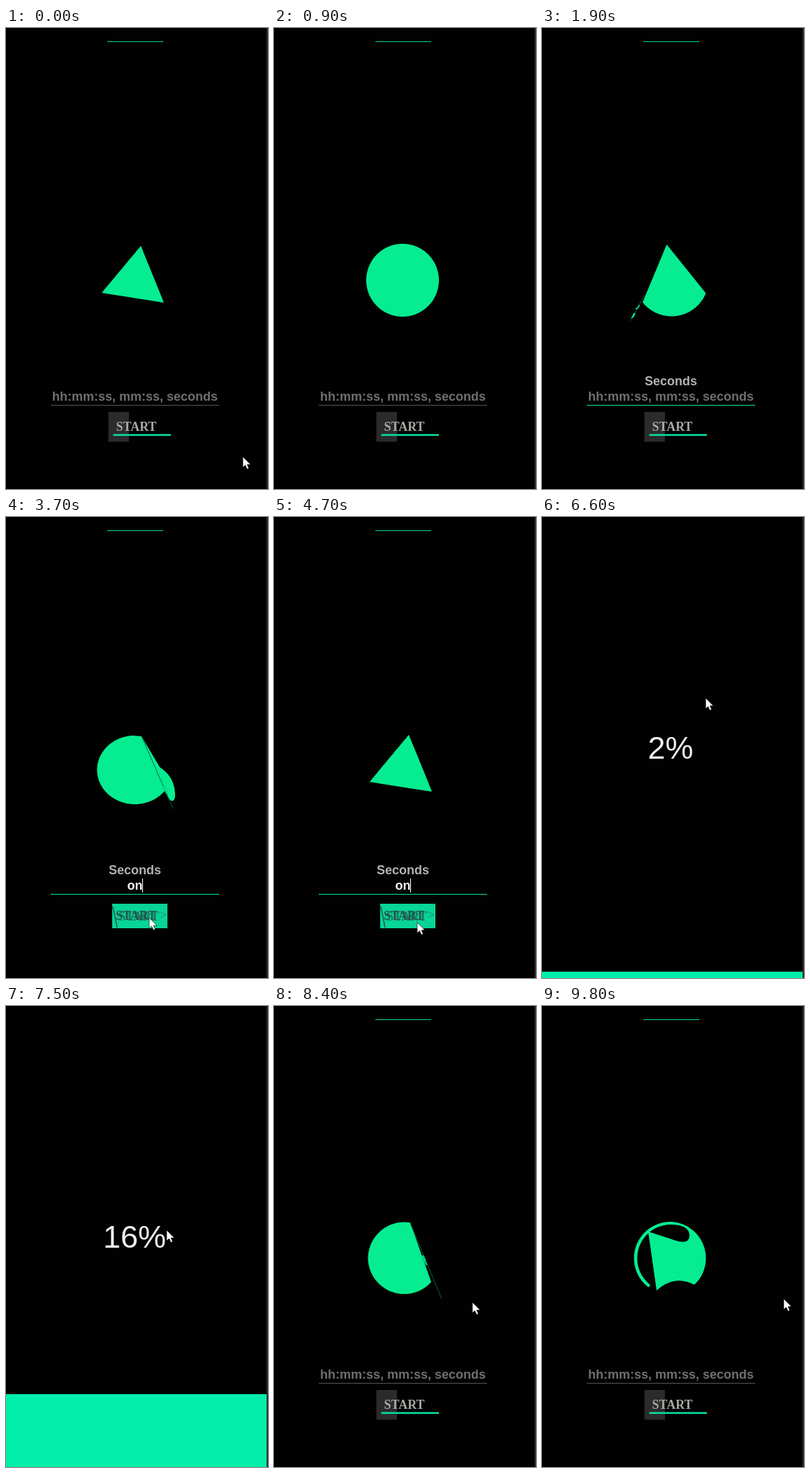
Write an HTML page that moves like this. It is 375 by 658 pixels and loops after 9900 ms.

```html
<!DOCTYPE html>
<html lang="en">
<head>
<meta charset="utf-8">
<title>Timer</title>
<style>
html, body { margin: 0; width: 100%; height: 100%; overflow: hidden; background: #000; }
svg { display: block; width: 375px; height: 658px; }
text { text-anchor: middle; }
.sans { font: bold 18px "Liberation Sans", Arial, sans-serif; }
.serif { font: bold 18px "Liberation Serif", Times, serif; }
.percent { font: 45px "Liberation Sans", Arial, sans-serif; fill: #eee; }
</style>
</head>
<body>
<svg viewBox="0 0 375 658">
  <rect width="375" height="658" fill="#010102"/>
  <g id="form">
    <rect x="145" y="19" width="80" height="1" fill="#08d898"/>
    <path id="blob" fill="#05ed90"/>
    <g id="slivers" stroke-linecap="round"></g>
    <text id="label" class="sans" x="184.5" y="510" fill="#b3b2b3">Seconds</text>
    <text id="value" class="sans" x="184.5" y="532"></text>
    <rect id="caret" x="195" y="516" width="1" height="20" fill="#fff"/>
    <rect id="underline" x="64" y="538" width="241" height="1"/>
    <g id="button">
      <rect x="146.5" y="548" width="29.5" height="42.5" fill="#2b2b2b"/>
      <text class="serif" x="186.5" y="575" fill="#aaa7a3">START</text>
      <rect x="153.5" y="579.6" width="82.5" height="2.6" fill="#08dfa0"/>
    </g>
    <g id="hover" fill="#24564a">
      <rect x="152" y="552" width="79" height="35" fill="#07d496"/>
      <path d="M153 556L159 586" stroke="#24564a" stroke-width="1.5"/>
      <text class="serif" x="186" y="575">START</text>
      <text class="serif" x="190" y="576" opacity=".75">START</text>
      <text class="serif" x="225" y="574" opacity=".4">&gt;</text>
    </g>
  </g>
  <g id="progress">
    <rect id="bar" width="373" height="658" fill="#00eeaa"/>
    <text id="percent" class="percent" x="184" y="345"></text>
  </g>
  <rect x="373" width="2" height="658" fill="#2e2e2e"/>
  <path id="cursor" d="M0 0V15L3.5 12L6 17.5L8.5 16.5L6.2 11H11Z" fill="#fff" stroke="#000" stroke-width=".6"/>
</svg>
<script>
const LOOP = 9900, STEP = 100, SAMPLES = 240;
const DRAIN = 0.038; // percent per ms
const el = id => document.getElementById(id);
const show = (id, on) => el(id).setAttribute('display', on ? 'inline' : 'none');
const mix = (a, b, k) => a + (b - a) * k;
const ease = k => k * k * (3 - 2 * k);
const within = (t, a, b) => t >= a && t < b;

function randomFrom(seed) {
  return () => (seed = seed * 16807 % 2147483647) / 2147483647;
}

const triangle = 'M193 311L226 392L137 378Z';
const disc = 'M184 308A52 52 0 0 1 184 412A52 52 0 0 1 184 308Z';
const sector = 'M178.5 309L234.5 378.5A53 53 0 0 1 144 391.5Z';
const tailed = 'M194 313L220 357Q243 372 242 400Q238 414 227 391A54 49 0 1 1 182 312Z';
const cutDisc = 'M195 309L225 394A52 52 0 0 1 134.5 361A52 52 0 0 1 186 308.5Z';
const ringFlag = 'M184 308A52 52 0 0 1 218 398Q190 383 164 406L152 322L186 333' +
  'Q212 343 211 326Q209 312 184 312A48 48 0 0 0 155 398L153 402A52 52 0 0 1 184 308Z';

function outline(d) {
  const path = document.createElementNS('http://www.w3.org/2000/svg', 'path');
  path.setAttribute('d', d);
  const length = path.getTotalLength();
  return Array.from({ length: SAMPLES }, (_, i) => {
    const { x, y } = path.getPointAtLength(length * i / SAMPLES);
    return [x, y];
  });
}

const poses = [
  [0, triangle], [900, disc], [1900, sector], [2800, disc], [3700, tailed],
  [4600, triangle], [6700, disc], [8400, cutDisc], [9000, disc], [9800, ringFlag]
].map(([time, d]) => [time, outline(d)]);

// Slivers break off along a line whenever the blob is cut.
const cuts = [
  { time: 1900, from: [147, 381], to: [126, 418] },
  { time: 3700, from: [194, 313], to: [239, 416] },
  { time: 8400, from: [195, 310], to: [240, 418] }
];

const cursorPath = [
  [0, 339, 612], [900, 260, 530], [3200, 230, 530], [3700, 205, 572],
  [5200, 205, 582], [5800, 238, 204], [7500, 230, 320], [8400, 284, 423], [9800, 346, 418]
];

const runs = [
  { begin: 5100, end: 6700, time: 5800, level: 31.8 },
  { begin: 7000, end: 7900, time: 7500, level: 15.8 }
];

function segment(keys, t) {
  const next = keys.findIndex(key => key[0] > t);
  if (next < 0) return [keys.at(-1), keys.at(-1), 0];
  const a = keys[next - 1], b = keys[next];
  return [a, b, (t - a[0]) / (b[0] - a[0])];
}

function drawBlob(t) {
  const [[, from], [, to], k] = segment(poses, t);
  const points = from.map(([x, y], i) =>
    mix(x, to[i][0], ease(k)).toFixed(1) + ' ' + mix(y, to[i][1], ease(k)).toFixed(1));
  el('blob').setAttribute('d', 'M' + points.join('L') + 'Z');
}

function sliver(x, y, dx, dy, width, color) {
  return `<path d="M${x} ${y}l${dx} ${dy}" stroke="${color}" stroke-width="${width}"/>`;
}

function drawSlivers(t) {
  const cut = cuts.find(c => Math.abs(t - c.time) < 300);
  if (!cut) return el('slivers').replaceChildren();
  const [x, y] = cut.from, dx = cut.to[0] - x, dy = cut.to[1] - y;
  const age = (t - cut.time) / 300, random = randomFrom(cut.time);
  let marks = sliver(x, y, dx, dy, 1, '#09603f');
  for (let i = 0; i < 4; i++) {
    const along = 0.4 + 0.5 * random() + 0.3 * age, size = 0.1 * random();
    marks += sliver(x + dx * along + 4 * random() - 2, y + dy * along, dx * size, dy * size,
      1 + 2 * random(), '#05d986');
  }
  el('slivers').innerHTML = marks;
  el('slivers').setAttribute('opacity', 1 - Math.abs(age));
}

function drawForm(t) {
  const focused = within(t, 1000, 5100);
  const hovered = within(t, 3500, 5100);
  const typed = focused ? 'on'.slice(0, Math.max(0, Math.floor((t - 2300) / 300))) : '';
  show('label', focused);
  show('caret', typed.length === 2);
  show('hover', hovered);
  show('button', !hovered);
  el('value').textContent = typed || 'hh:mm:ss, mm:ss, seconds';
  el('value').setAttribute('fill', typed ? '#f4f4f4' : '#706e72');
  el('underline').setAttribute('fill', focused ? '#08e6a0' : '#555');
  drawBlob(t);
  drawSlivers(t);
}

function drawProgress(t, run) {
  const level = run.level - DRAIN * (t - run.time);
  el('bar').setAttribute('y', Math.round(658 * (1 - level / 100)));
  el('percent').textContent = Math.ceil(level) + '%';
}

function drawCursor(t) {
  const [[, x1, y1], [, x2, y2], k] = segment(cursorPath, t);
  show('cursor', !within(t, 900, 3200));
  el('cursor').setAttribute('transform', `translate(${mix(x1, x2, k)} ${mix(y1, y2, k)})`);
}

function render(t) {
  const run = runs.find(r => within(t, r.begin, r.end));
  show('form', !run);
  show('progress', run);
  if (run) drawProgress(t, run); else drawForm(t);
  drawCursor(t);
}

const start = performance.now();
function tick() {
  const t = Math.floor((performance.now() - start) % LOOP / STEP) * STEP;
  render(within(t, 5800, 6100) ? 5800 : t); // the screen stalls briefly here
  requestAnimationFrame(tick);
}
tick();
</script>
</body>
</html>
```
